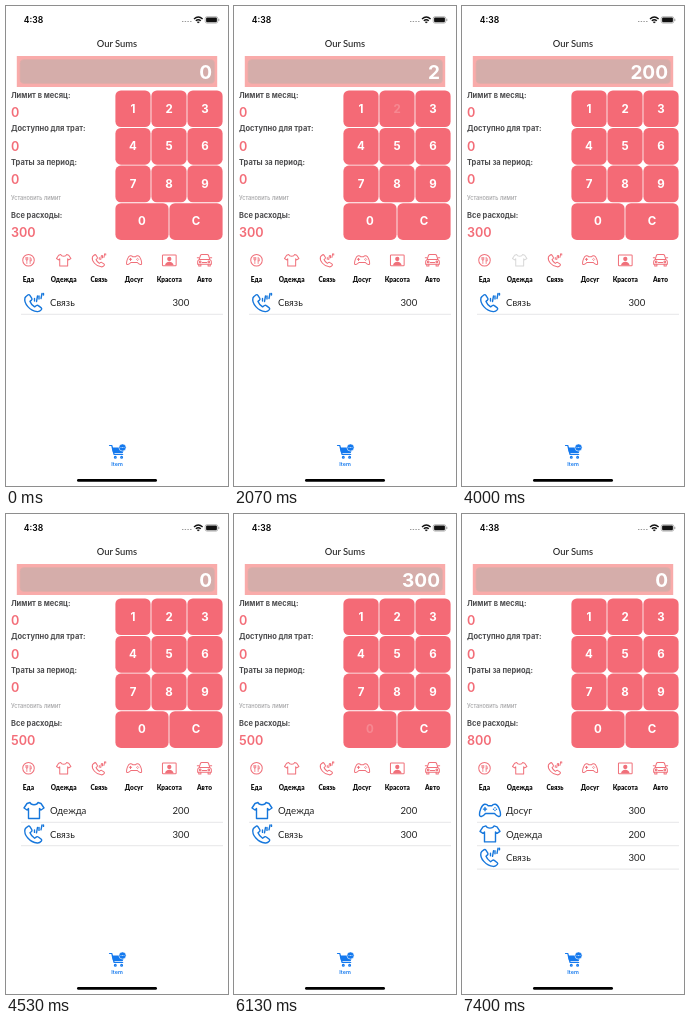
Animation of 222 by 480 pixels, one loop 8000 ms. Source, as an HTML page:

```html
<!DOCTYPE html>
<html lang="ru">
<head>
<meta charset="utf-8">
<title>Our Sums</title>
<style>
html, body { margin: 0; width: 100%; height: 100%; overflow: hidden; background: #fff; }
svg { display: block; width: 100vw; height: 100vh; }
text { font-family: Lato, "Open Sans", sans-serif; }
.ui { font-family: Inter, Roboto, sans-serif; }
.label { font-size: 7.5px; font-weight: 700; fill: #4c4c4e; }
.sum { font-size: 12.6px; font-weight: 600; fill: #f36d78; }
.key { fill: #f46a76; }
.digit { font-size: 11.5px; font-weight: 700; fill: #fff; text-anchor: middle; }
.category { font-size: 6.5px; font-weight: 900; fill: #111; text-anchor: middle; }
.row text { font-size: 9.6px; fill: #222; }
.icon { fill: none; stroke: currentColor; stroke-width: 1.4; stroke-linecap: round; stroke-linejoin: round; }
.icon .solid { fill: currentColor; stroke: none; }
#categories use { stroke-width: 1.1; }
</style>
</head>
<body>
<svg id="stage" viewBox="0 0 222 480" xmlns="http://www.w3.org/2000/svg">
  <defs>
    <g id="food" class="icon">
      <circle r="8"/>
      <path d="M-3.6-4V-1.5Q-3.6 0-2.3 0T-1-1.5V-4M-2.3-4V4.5M2.3 4.5V-4Q4.3-3 4 .8H2.3" stroke-width="1.1"/>
    </g>
    <g id="shirt" class="icon">
      <path d="M-4-8C-3-5 3-5 4-8L7-7 10-2.5 7-.5 5.5-2V8H-5.5V-2L-7-.5-10-2.5-7-7Z"/>
    </g>
    <g id="phone" class="icon">
      <path d="M-8-6l2.2-1.7q1-.5 1.7.5l1.9 3q.5 1-.3 1.8l-1.5 1.3q1 2.8 4.6 5.5l1.9-1.4q1-.6 1.8.1l3 2.3q.8.8.1 1.7q-1.9 2.3-4.2 2C-4 8.5-10.5 1-9-4.7Z"/>
      <path d="M.5-1.5V-4M2.5-1l1-5.5M5-3.5V-6.5M7-4l1-5M9.5-7.5V-9"/>
    </g>
    <g id="pad" class="icon">
      <path d="M-5.5-6.2Q-3-6.5-2-4.8H2Q3-6.5 5.5-6.2C8.5-5.5 10.5 1 10.5 4C10.5 7 7.5 6.5 4.5 3H-4.5C-7.5 6.5-10.5 7-10.5 4C-10.5 1-8.5-5.5-5.5-6.2Z"/>
      <path d="M-5-3V.2M-6.6-1.4H-3.4M5-2.8v.1M5 0v.1M3.5-1.4v.1M6.5-1.4v.1"/>
    </g>
    <g id="beauty" class="icon">
      <rect x="-9.5" y="-7.5" width="19" height="15" rx="1"/>
      <circle class="solid" cy="-1.8" r="3"/>
      <path class="solid" d="M-6 7Q-5 2 0 2T6 7Z"/>
    </g>
    <g id="car" class="icon">
      <path d="M-7.5-1L-5.5-7Q-5-8-4-8H4Q5-8 5.5-7L7.5-1Q9.5 0 9.5 2V5.5H-9.5V2Q-9.5 0-7.5-1ZM-7.5-1H7.5M-8 5.5V8H-5V5.5M8 5.5V8H5V5.5M-10-3.5h2M10-3.5h-2M-3 3H3"/>
      <circle cx="-6" cy="2.2" r="1.2"/><circle cx="6" cy="2.2" r="1.2"/>
    </g>
  </defs>

  <rect width="222" height="480" fill="#fff"/>

  <text class="ui" x="17.8" y="16.7" font-size="8.6" font-weight="600">4:38</text>
  <path d="M176 15.5h10" stroke="#999" stroke-width="1.2" stroke-dasharray="1.4 1.3"/>
  <g fill="none" stroke="#111" stroke-width="1.4" transform="translate(0 .4)">
    <path d="M188 12.5Q192.3 8.7 196.6 12.5M189.8 14.4Q192.3 12.2 194.8 14.4"/>
    <path d="M192.3 16.7l-1-1.2h2Z" stroke-width=".7" fill="#111"/>
  </g>
  <rect x="199.2" y="10.7" width="12.6" height="6.4" rx="1.8" fill="none" stroke="#999" stroke-width=".7"/>
  <rect x="200.1" y="11.6" width="10.8" height="4.6" rx="1" fill="#111"/>
  <path d="M212.8 12.8v2.2" stroke="#999"/>
  <text x="111" y="41" font-size="9.4" font-weight="500" fill="#222" text-anchor="middle">Our Sums</text>

  <rect x="10.8" y="50" width="200.4" height="31" fill="#f9abaa"/>
  <rect x="14" y="53.5" width="194.5" height="24" rx="4" fill="#d5adaa" stroke="#e2aca9" stroke-width=".8"/>
  <text id="display" class="ui" x="206" y="73" font-size="19" font-weight="700" fill="#fff" text-anchor="end">0</text>

  <g id="labels"></g>
  <text class="ui" x="5" y="194" font-size="5.6" font-weight="500" fill="#a3a3a5">Установить лимит</text>
  <g id="keys"></g>
  <g id="categories"></g>
  <g id="rows"></g>

  <g fill="none" stroke="#1479ee" stroke-width="1.2" stroke-linecap="round" stroke-linejoin="round">
    <path d="M103.5 439.5h2.3l2.3 9h8.6"/>
    <path d="M106.4 442h11.3l-1.4 4.6h-8.7Z" fill="#1479ee"/>
    <circle cx="109.3" cy="451.2" r=".9"/><circle cx="115.6" cy="451.2" r=".9"/>
  </g>
  <circle cx="116.5" cy="441.5" r="3.6" fill="#1479ee" stroke="#fff" stroke-width=".6"/>
  <path d="M114.6 441.5h4" stroke="#fff" stroke-width=".8" stroke-dasharray=".8 .7"/>
  <text class="ui" x="111" y="459.7" font-size="5.4" font-weight="600" fill="#1479ee" text-anchor="middle">Item</text>
  <rect x="71" y="473" width="80" height="2.8" rx="1.4" fill="#000"/>
</svg>
<script>
const LOOP = 8000, FADE = 330, FRAME = 200 / 3;
const PINK = [240, 112, 122], GRAY = [216, 216, 216];
const $ = id => document.getElementById(id);

function add(parent, tag, attrs, content = '') {
  const el = document.createElementNS('http://www.w3.org/2000/svg', tag);
  for (const name in attrs) el.setAttribute(name, attrs[name]);
  el.textContent = content;
  return parent.appendChild(el);
}

// Labels with their amounts
[['Лимит в месяц:', 92, 111], ['Доступно для трат:', 125, 145],
 ['Траты за период:', 159, 178], ['Все расходы:', 212, 231]].forEach(([name, y, sumY], i) => {
  add($('labels'), 'text', { class: 'ui label', x: 5, y }, name);
  const sum = add($('labels'), 'text', { class: 'ui sum', x: 5, y: sumY }, '0');
  if (i === 3) sum.id = 'total';
});

// Keypad
const digits = {};
function addKey(name, x, y, width) {
  add($('keys'), 'rect', { class: 'key', x: x + .4, y: y + .4, width: width - .8, height: 36.7, rx: 5.5 });
  digits[name] = add($('keys'), 'text', { class: 'ui digit', x: x + width / 2, y: y + 22.5 }, name);
}
for (let i = 0; i < 9; i++) addKey(String(i + 1), 109 + i % 3 * 36, 84 + Math.floor(i / 3) * 37.6, 36);
addKey('0', 109, 196.8, 54);
addKey('C', 163, 196.8, 54);

// Categories
const icons = {};
[['food', 'Еда'], ['shirt', 'Одежда'], ['phone', 'Связь'],
 ['pad', 'Досуг'], ['beauty', 'Красота'], ['car', 'Авто']].forEach(([icon, name], i) => {
  const x = 22.5 + i * 35.2;
  icons[icon] = add($('categories'), 'use', {
    href: '#' + icon, transform: `translate(${x} 254.3) scale(.72)`
  });
  add($('categories'), 'text', { class: 'category', x, y: 276.2 }, name);
});

// Expenses, oldest first; a new one appears on top
const expenses = [['phone', 'Связь', 300], ['shirt', 'Одежда', 200], ['pad', 'Досуг', 300]];
const rows = expenses.map(([icon, name, amount]) => {
  const row = add($('rows'), 'g', { class: 'row' });
  add(row, 'use', { href: '#' + icon, x: 28, y: 11.5, color: '#1677dc' });
  add(row, 'text', { x: 44, y: 15.2 }, name);
  add(row, 'text', { x: 166.5, y: 15.2 }, amount);
  add(row, 'path', { d: 'M15 23.3H217', stroke: '#dcdcde', 'stroke-width': .7 });
  return row;
});

const displaySteps = [[0, '0'], [1940, '2'], [2670, '20'], [2870, '200'], [4130, '0'],
  [5270, '3'], [5800, '30'], [6070, '300'], [6870, '0']];
const countSteps = [[0, 1], [4130, 2], [6870, 3]];
// name, touch down, release
const keyPresses = [['2', 1870, 2070], ['0', 2600, 2800], ['0', 2800, 3000],
  ['3', 5200, 5400], ['0', 5730, 5930], ['0', 6000, 6200]];
const iconPresses = [['shirt', 4000, 4200], ['pad', 6730, 7000]];

const stepAt = (steps, t) => steps.filter(([start]) => start <= t).pop()[1];

// 0 while held, easing to 1 after release
function recovery(presses, name, t) {
  const last = presses.filter(p => p[0] === name && p[1] <= t).pop();
  if (!last) return 1;
  const u = Math.min(1, Math.max(0, (t - last[2]) / FADE));
  return u * u * (3 - 2 * u);
}

function draw(now) {
  const t = Math.floor((now % LOOP + 4) / FRAME) * FRAME + 4;
  $('display').textContent = stepAt(displaySteps, t);
  const count = stepAt(countSteps, t);
  $('total').textContent = expenses.slice(0, count).reduce((sum, e) => sum + e[2], 0);
  rows.forEach((row, i) => {
    row.setAttribute('visibility', i < count ? 'visible' : 'hidden');
    row.setAttribute('transform', `translate(0 ${285 + (count - 1 - i) * 23.4})`);
  });
  for (const name in digits) digits[name].setAttribute('opacity', .2 + .8 * recovery(keyPresses, name, t));
  for (const name in icons) {
    const k = recovery(iconPresses, name, t);
    icons[name].setAttribute('color', `rgb(${GRAY.map((g, i) => Math.round(g + (PINK[i] - g) * k))})`);
  }
}

const start = performance.now();
function tick() {
  draw(performance.now() - start);
  requestAnimationFrame(tick);
}
tick();
</script>
</body>
</html>
```
